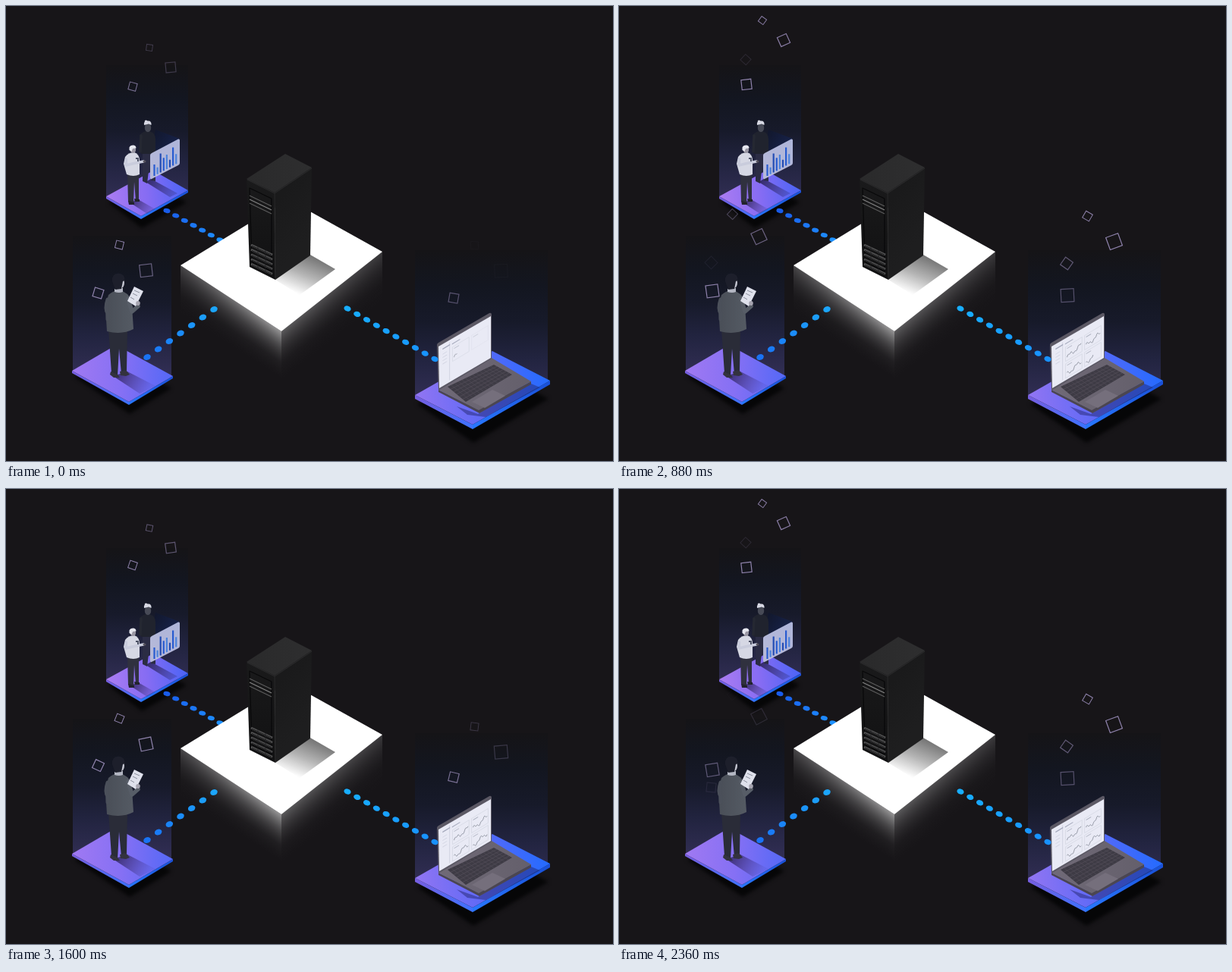
An HTML page with a canvas for the animation above (2400 ms loop, 800 px wide and 600 px high).

```html
<!DOCTYPE html>
<html lang="en">
<head>
<meta charset="utf-8">
<title>Connected platforms</title>
<style>
html, body { margin: 0; width: 100%; height: 100%; overflow: hidden; background: #171518; }
canvas { display: block; }
</style>
</head>
<body>
<canvas id="stage" width="800" height="600"></canvas>
<script>
const LOOP = 2400;
const stage = document.getElementById('stage').getContext('2d');
const scenery = document.createElement('canvas');
scenery.width = 800;
scenery.height = 600;
const g = scenery.getContext('2d');

const clamp = v => Math.max(0, Math.min(1, v));
const mix = (a, b, k) => a + (b - a) * k;

function fill(path, color) {
  g.fillStyle = color;
  g.fill(new Path2D(path));
}

function line(path, color, width, cap = 'butt') {
  g.strokeStyle = color;
  g.lineWidth = width;
  g.lineCap = cap;
  g.lineJoin = 'round';
  g.stroke(new Path2D(path));
}

function ramp(x0, y0, x1, y1, ...colors) {
  const grad = g.createLinearGradient(x0, y0, x1, y1);
  colors.forEach((c, i) => grad.addColorStop(i / (colors.length - 1), c));
  return grad;
}

function ellipse(x, y, rx, ry, color, angle = 0) {
  g.fillStyle = color;
  g.beginPath();
  g.ellipse(x, y, rx, ry, angle, 0, 7);
  g.fill();
}

// Isometric slab with a translucent wall rising behind it.
function platform({ left, bottom, right, depth, wallTop, wallLeft, wallRight, tones }) {
  const [lx, ly] = left, [bx, by] = bottom, [rx, ry] = right;
  const tx = lx + rx - bx, ty = ly + ry - by;
  const drop = depth * 4;
  g.save();
  g.filter = 'blur(2.5px)';
  fill(`M${lx + 3} ${ly + drop * .5}L${bx + 1} ${by + drop}L${rx - 2} ${ry + drop}L${tx} ${ty + drop}Z`, '#060607');
  g.restore();
  fill(`M${wallLeft} ${wallTop}H${wallRight}V${ry}L${tx} ${ty}L${wallLeft} ${ly}Z`,
    ramp(0, wallTop, 0, ly, '#151417', '#131620', '#171a2a', '#222440', '#302d52'));
  fill(`M${lx} ${ly}L${bx} ${by}V${by + depth}L${lx} ${ly + depth - 1}Z`,
    ramp(lx, 0, bx, 0, '#775ee0', '#3d72ff'));
  fill(`M${bx} ${by}L${rx} ${ry}V${ry + depth - 1}L${bx} ${by + depth}Z`,
    ramp(bx, 0, rx, 0, '#2878ff', '#1950d8'));
  fill(`M${lx} ${ly}L${bx} ${by}L${rx} ${ry}L${tx} ${ty}Z`, ramp(lx, ly, rx, ry, ...tones));
}

function dots(x0, y0, x1, y1, count, rx, ry, angle, from, to) {
  for (let i = 0; i < count; i++) {
    const k = i / (count - 1);
    const rgb = from.map((c, j) => Math.round(mix(c, to[j], k)));
    ellipse(mix(x0, x1, k), mix(y0, y1, k), rx, ry, `rgb(${rgb})`, angle);
  }
}

function fadingSide(x, y, w, slope, h, strength, dimStart, dimEnd) {
  g.save();
  g.transform(1, slope, 0, 1, x, y);
  g.save();
  g.globalAlpha = strength;
  g.fillStyle = ramp(0, 0, 0, h, 'rgba(205,205,205,.88)', 'rgba(150,150,150,.5)',
    'rgba(90,90,90,.18)', 'rgba(60,60,60,0)');
  g.fillRect(0, 0, w, h);
  g.restore();
  g.fillStyle = ramp(0, 0, w, 0, `rgba(23,21,24,${dimStart})`, `rgba(23,21,24,${dimEnd})`);
  g.fillRect(0, 0, w, h);
  g.restore();
}

function drawCenter() {
  fadingSide(230, 342, 133, 87 / 133, 62, .85, .65, .05);
  fadingSide(363, 429, 133, -105 / 133, 64, .45, .05, .5);
  fill('M230 342L372 255L496 324L363 429Z', '#fff');
  fill('M355 361L401 328L434 347L387 381Z', ramp(405, 332, 386, 379, '#787878', '#b4b4b4', '#fcfcfc'));

  fill('M317 228L354 246L355 361L321 344Z', ramp(0, 230, 0, 360, '#1a1a1b', '#111112'));
  fill('M354 246L403 213L401 329L355 361Z', ramp(354, 260, 402, 300, '#1a1a1b', '#1e1e1f'));
  fill('M317 228L368 195L403 213L354 246Z', ramp(318, 228, 403, 213, '#2a2a2b', '#2e2e2f'));
  line('M318 229L354 247L403 214', '#323233', .8);
  line('M354 247L355 360', '#282829', 1);
  line('M321 240L350 254V350L324 337Z', '#080809', 1.2);
  [250, 255, 260].forEach((y, i) => line(`M321 ${y}L350 ${y + 14}`, i === 1 ? '#858585' : '#5c5c5c', 1.2));
  for (let i = 0; i < 5; i++) {
    const y = 315 + i * 6.3;
    line(`M323 ${y}L351 ${y + 13}`, '#565657', 2.6);
    line(`M324 ${y + 1}L350 ${y + 13}`, '#1b1b1c', 1);
    line(`M332 ${y + 2}V${y + 7}M342 ${y + 7}V${y + 12}`, '#252526', 1);
  }
}

function drawTeam() {
  platform({
    left: [132, 251], bottom: [178, 277], right: [240, 243], depth: 4,
    wallTop: 78, wallLeft: 132, wallRight: 240, tones: ['#ab7cf2', '#866cf3', '#4a64f6']
  });
  fill('M184 232L191 228L226 247L216 252Z', ramp(185, 230, 222, 250, 'rgba(30,25,65,.8)', 'rgba(40,35,100,.25)'));
  fill('M163 259L174 255L197 268L186 274Z', ramp(166, 256, 193, 271, 'rgba(30,25,65,.75)', 'rgba(60,45,120,.15)'));
  fill('M197 163L229 175L190 197Z', ramp(198, 165, 225, 184, '#12182e', '#17224a'));

  fill('M180 190L180 231L186 234L189 210L191 230L197 231L197 188Z', '#2b2c44');
  fill('M176 170Q182 164 189 165Q197 167 197 176L197 195H178Z', '#20232e');
  line('M178 171L177 192', '#252832', 3.5, 'round');
  ellipse(187, 160.5, 4.2, 5.8, '#474a56');
  fill('M182 157Q181 151 187 151.5Q192 151 191.5 157L188 155.5Z', '#d8d9e4');
  ellipse(184.5, 152, 1.8, 1.6, '#d8d9e4');

  g.save();
  g.globalAlpha = .94;
  fill('M192 194L227 175.5Q229 175 229 177V207Q229 209 227 210L192 228Q190 229 190 226V197Q190 195 192 194Z',
    ramp(190, 220, 229, 180, '#bfc2e2', '#b8bfe4'));
  g.restore();
  [15, 9, 25, 17, 19, 10, 24, 13].forEach((h, i) => {
    const x = 195.5 + i * 4.1, y = 224 - i * 2.25;
    line(`M${x} ${y}V${y - h}`, ['#285bd0', '#4d83dc', '#244db4'][i % 3], 2.2);
  });

  fill('M160 220L161 258L168 260L169 232L171 257L175 256L175 220Z', '#30313f');
  fill('M161 257L169 259V262H162ZM169 254L176 255V258H170Z', '#22232d');
  fill('M157 199Q161 193 169 193Q175 195 176 202L176 222Q168 226 159 222L155 208Z', '#d6d8e4');
  line('M158.5 202L158 210L171 207L181 205', '#c9ccdc', 3.5, 'round');
  ellipse(182.5, 205, 2, 1.5, '#55515d');
  line('M171 201H174V205', '#4d5265', 2);
  ellipse(167.5, 189.5, 3.6, 4.6, '#9a97a4');
  fill('M162.5 190V186.5Q163.5 183.5 168 183.5Q171.5 184 171.5 187.5L167 188L165.5 192Z', '#e6e7ef');
}

function drawReader() {
  platform({
    left: [87, 481], bottom: [162, 522], right: [220, 488], depth: 4,
    wallTop: 303, wallLeft: 88, wallRight: 218, tones: ['#a079f2', '#8570f4', '#5468f6']
  });
  fill('M141 488L160 482L197 501L176 511Z', ramp(146, 484, 188, 507, 'rgba(33,25,72,.75)', 'rgba(55,42,115,.08)'));
  fill('M135 426L139 484L147 488L149 452L152 485L159 482L160 426Z', '#2a2c38');
  fill('M138 482L147 486L150 490H142L137 486ZM150 482L158 480L163 486L158 488L151 487Z', '#33323e');
  fill('M135 381Q142 374 152 375L160 380Q166 386 166 396L168 426Q153 434 133 429L131 396Z',
    ramp(130, 0, 170, 0, '#494e57', '#555b64'));
  line('M134 387Q130 399 134 405L134 413', '#4b505a', 5, 'round');
  line('M161 386L166 403L174 396', '#575d67', 5.5, 'round');
  fill('M169 370L181 376L171 396L160 389Z', '#dfe1ec');
  line('M169 375L176 378M167 379L173 382M164 384L169 387', '#777b8b', .8);
  ellipse(174, 392, 2.8, 3, '#a6a4b0');
  fill('M143 373L154 372L154 377Q149 379 143 377Z', '#b4b7c3');
  ellipse(151, 365, 5, 7.5, '#c4c5d0');
  fill('M140 363Q139 353 148 352.5Q157 353 156.5 362L154 363L152 373L144 374Z', '#1d1f2b');
}

function drawLaptop() {
  platform({
    left: [539, 513], bottom: [615, 552], right: [717, 494], depth: 6,
    wallTop: 322, wallLeft: 539, wallRight: 714, tones: ['#9275f2', '#5c69f7', '#236bff']
  });
  fill('M594 528L622 538L692 498L704 503L632 542L608 539Z', 'rgba(29,32,99,.45)');
  fill('M570 506L622 532L692 495V499L624 537L570 509Z', '#4b4651');
  fill('M570 506L640 464L692 495L623 533Z', ramp(570, 500, 692, 500, '#706a77', '#645f6b'));
  fill('M582 502L643 473L667 486L606 522Z', '#3e3b45');
  for (let i = 1; i < 6; i++) line(`M${582 + i * 4} ${502 + i * 3.3}L${643 + i * 4} ${473 + i * 2.2}`, '#59535f', .6);
  for (let i = 1; i < 13; i++) line(`M${582 + i * 4.7} ${502 - i * 2.25}L${606 + i * 4.7} ${522 - i * 2.75}`, '#55505b', .5);
  fill('M614 522L641 506L658 514L631 530Z', '#756f7c');
  fill('M568 447Q568 445 570 444L637 405Q640 404 640 407V465L570 507Z', '#5b5864');
  fill('M570 449L639 409V464L571 504Z', '#e9eaf5');
}

function drawScenery() {
  g.fillStyle = '#171518';
  g.fillRect(0, 0, 800, 600);
  drawTeam();
  drawReader();
  dots(212, 270, 282, 308.5, 7, 4.6, 3, .2, [25, 92, 235], [30, 145, 255]);
  drawCenter();
  drawLaptop();
  dots(186, 463, 274, 400, 7, 4.9, 3.8, -.4, [25, 115, 245], [28, 165, 250]);
  dots(450, 399, 565, 465.5, 10, 4.7, 3.5, .35, [24, 174, 255], [24, 145, 255]);
}

function drawDashboard(t) {
  stage.save();
  stage.transform(.66, -.4, 0, .54, 572, 449);
  stage.lineWidth = 1;
  stage.strokeStyle = '#d3d5e2';
  stage.strokeRect(19, 4, .1, 92);
  stage.fillStyle = '#a1a6b9';
  stage.fillRect(5, 9, 15, 2.5);
  stage.fillRect(24, 11, 16, 2);
  for (let i = 0; i < 4; i++) {
    stage.fillStyle = '#ced1df';
    stage.fillRect(5, 22 + i * 8, 9, 1.5);
  }
  [-80, 10, 520, 690].forEach((start, i) => {
    const x = 25 + (i % 2) * 38, y = i < 2 ? 20 : 61;
    const shown = clamp((t - start) / 360);
    stage.globalAlpha = clamp((t - start + 100) / 220);
    stage.strokeStyle = '#cdd0dc';
    stage.lineWidth = .8;
    stage.strokeRect(x, y, 33, 35);
    stage.fillStyle = '#a4a9b8';
    stage.fillRect(x + 3, y + 5, 10, 1.5);
    stage.strokeStyle = '#7e838f';
    stage.lineWidth = 1.1;
    stage.beginPath();
    for (let j = 0; j <= 28 * shown; j++) {
      const level = 27 - j * .35 - 4 * Math.sin(j * .3 + i) - 2 * Math.sin(j * .9);
      stage.lineTo(x + 3 + j, y + level);
    }
    stage.stroke();
  });
  stage.restore();
}

// Each square: x, initial y, size, start, rise, turn in degrees.
const swarms = [
  { period: 1480, life: 1480, fadeIn: [80, 550], end: 1190, straight: 0, squares: [
    [189, 57.8, 8, -240, 45, 48], [217, 83.8, 13, -240, 45, -32],
    [167, 118, 10, -490, 48, 46], [168, 115.5, 13, 280, 34, -16]] },
  { period: 1350, life: 1420, fadeIn: [150, 380], end: 1150, straight: .4, squares: [
    [149.5, 327.5, 10, -400, 56, 48], [184.5, 358, 16, -310, 60, -30],
    [121.5, 398, 12, -520, 60, 46], [123, 398, 16, 180, 45, -16]] },
  { period: 1480, life: 1600, fadeIn: [100, 550], end: 1430, straight: 0, squares: [
    [617.5, 316.5, 10, -120, 57, 48], [652.5, 350, 17, -120, 57, -32],
    [590, 392, 12, -350, 60, 46], [591, 387, 17, 540, 50, -14]] }
];

function drawSquare([x, y, size, start, rise, turn], age, { life, fadeIn, end, straight }) {
  const u = age / life;
  const lift = mix((1 - Math.cos(Math.PI * u)) / 2, u, straight);
  const appear = clamp((age - fadeIn[0]) / (fadeIn[1] - fadeIn[0]));
  const alpha = appear * clamp((1430 - age) / 330) * clamp((end - start - age) / 230);
  if (alpha <= 0) return;
  stage.save();
  stage.translate(x, y - rise * lift);
  stage.rotate(turn * u * Math.PI / 180);
  stage.globalAlpha = alpha;
  stage.strokeStyle = '#8f83ac';
  stage.lineWidth = size < 11 ? 1 : 1.2;
  stage.strokeRect(-size / 2, -size / 2, size, size);
  stage.restore();
}

function render(t) {
  stage.drawImage(scenery, 0, 0);
  drawDashboard(t);
  for (const swarm of swarms) {
    const { period, life } = swarm;
    for (const square of swarm.squares) {
      const age = ((t - square[3]) % period + period) % period;
      for (let a = age; a < life; a += period) drawSquare(square, a, swarm);
    }
  }
}

drawScenery();
render(0);
let origin;
function tick(now) {
  origin ??= now;
  render((now - origin) % LOOP);
  requestAnimationFrame(tick);
}
requestAnimationFrame(tick);
</script>
</body>
</html>
```
